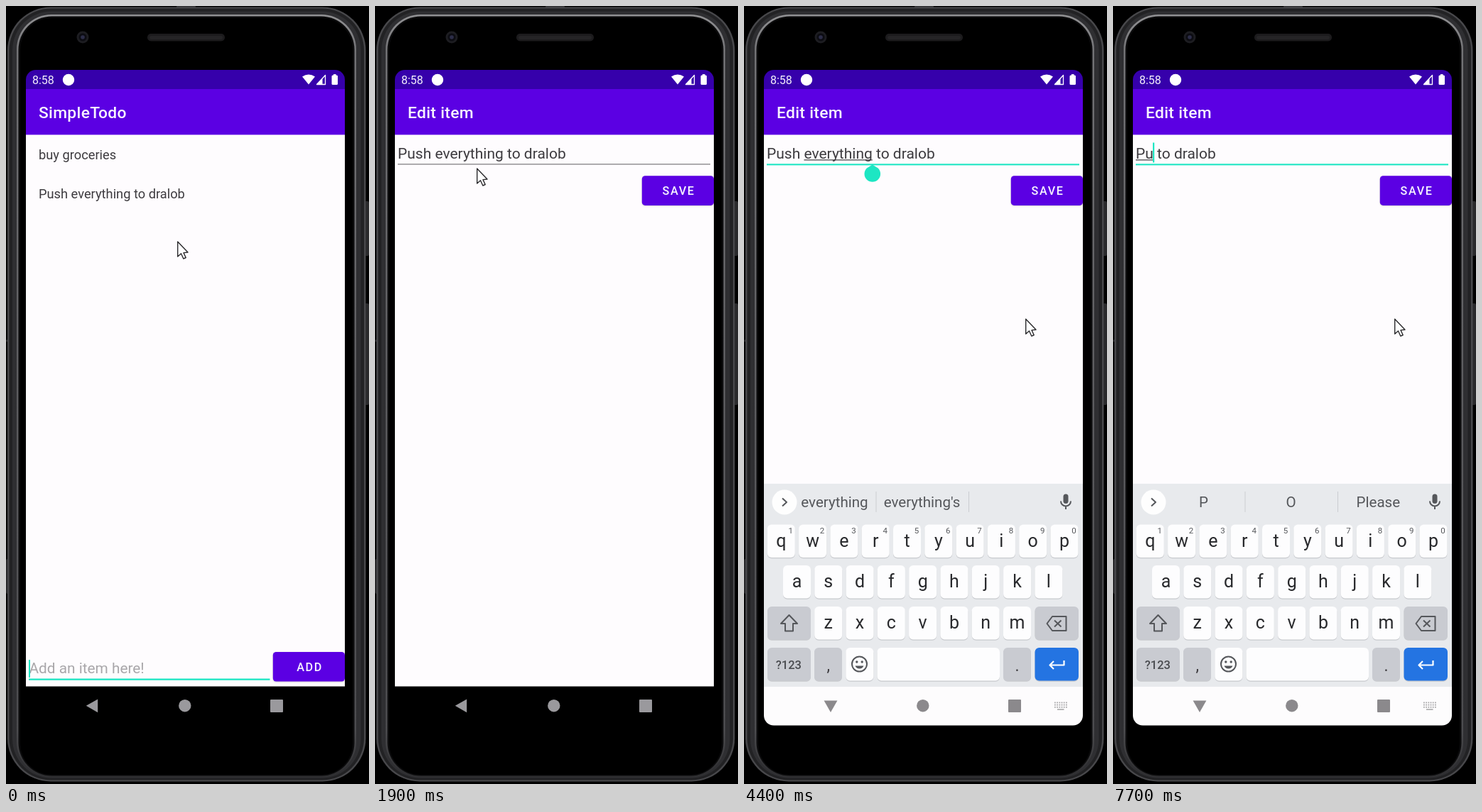
Recreate the animation shown at these times as an HTML page with a canvas. Size 511 px wide and 1096 px high, loop 8 s.

```html
<!DOCTYPE html>
<html lang="en">
<head>
<meta charset="utf-8">
<title>SimpleTodo</title>
<style>
html, body { margin: 0; width: 100%; height: 100%; overflow: hidden; background: #000; }
canvas { display: block; width: 511px; height: 1096px; }
</style>
</head>
<body>
<canvas id="stage"></canvas>
<script>
const W = 511, H = 1096, LOOP = 8000, STEP = 100;
const canvas = document.getElementById('stage');
const dpr = window.devicePixelRatio || 1;
canvas.width = W * dpr;
canvas.height = H * dpr;
const c = canvas.getContext('2d');

const PURPLE = '#5b00e3', DARK = '#3600ab', PAPER = '#fefcfe', TEAL = '#1de6c3';
const INK = '#3d3b3f', GREY = '#55575b';
const SCREEN = { x: 28, y: 90, w: 449, h: 923.5 };
const FIELD = 21, HINT = 20.57;
const TAIL = ' to dralob';

// [time, x, y] of the pointer tip
const POINTER = [
  [0, 241, 331], [100, 226, 321], [200, 190, 291], [300, 160, 266], [400, 145, 256],
  [1500, 145, 256], [1700, 143, 240], [2000, 143, 222], [2200, 148, 211], [2400, 165, 214],
  [2600, 178, 222], [2700, 178, 222], [2800, 179, 213], [3300, 179, 213], [3600, 273, 218],
  [3800, 345, 340], [4000, 396, 440]
];
const OPEN_SCALE = [[1100, .9], [1200, .955], [1300, .99], [1400, .997], [1500, 1]];
const EXIT_SCALE = [[1100, 1], [1200, 1.03], [1300, 1.046]];
const KEYS_DROP = [[3200, 345], [3300, 130], [3400, 52], [3500, 19], [3600, 6], [3700, 0]];
const BACK_TURN = [[3500, 0], [3600, -9], [3700, -50], [3800, -90]];

const TYPED = [
  [0, 'Push everything'], [4900, 'Push everythin'], [5100, 'Push everythi'], [5300, 'Push everyth'],
  [5500, 'Push everyt'], [5600, 'Push every'], [5700, 'Push ev'], [5800, 'Push'],
  [6000, 'Pu'], [6100, 'P'], [6200, ''], [7000, 'P'], [7700, 'Pu']
];
const HINTS = [
  [0, ['everything', "everything's"]],
  [5100, ['everythin', 'everything', "everything's"]],
  [5300, ['everythi', 'everything', "everything's"]],
  [5600, ['everyt', 'every', 'everything']],
  [5700, ['every', 'everyone', 'everything']],
  [5800, ['Push', 'push', 'Pushing']],
  [6200, null], [7700, ['P', 'O', 'Please']]
];

const within = (t, a, b) => t >= a && t < b;
const latest = (list, t) => list.filter(k => k[0] <= t).pop()[1];

function tween(keys, t, i = 1) {
  const n = keys.findIndex(k => k[0] > t);
  if (n < 0) return keys[keys.length - 1][i];
  if (n === 0) return keys[0][i];
  const a = keys[n - 1], b = keys[n];
  return a[i] + (b[i] - a[i]) * (t - a[0]) / (b[0] - a[0]);
}

function rect(x, y, w, h, color) {
  c.fillStyle = color;
  c.fillRect(x, y, w, h);
}
function round(x, y, w, h, r, color) {
  c.fillStyle = color;
  c.beginPath();
  c.roundRect(x, y, w, h, r);
  c.fill();
}
function dot(x, y, r, color) {
  c.fillStyle = color;
  c.beginPath();
  c.arc(x, y, r, 0, 7);
  c.fill();
}
function shape(path, fill, stroke, width = 2) {
  const p = new Path2D(path);
  if (fill) { c.fillStyle = fill; c.fill(p); }
  if (stroke) { c.strokeStyle = stroke; c.lineWidth = width; c.stroke(p); }
}
function setFont(size, weight = 400, gap = 0) {
  c.font = `${weight} ${size}px Roboto, "Noto Sans", sans-serif`;
  c.letterSpacing = gap + 'px';
}
function text(s, x, y, size, color, { weight = 400, align = 'left', gap = 0 } = {}) {
  setFont(size, weight, gap);
  c.textAlign = align;
  c.fillStyle = color;
  c.fillText(s, x, y);
}
function place(x, y, draw, scale = 1, turn = 0) {
  c.save();
  c.translate(x, y);
  c.rotate(turn * Math.PI / 180);
  c.scale(scale, scale);
  draw();
  c.restore();
}

function phone() {
  rect(0, 0, W, H, '#000');
  round(240, 0, 27, 5, 1, '#343436');
  for (const [x, y, h] of [[504, 275, 77], [504, 419, 143], [0, 470, 3], [0, 779, 49]])
    round(x, y, 7, h, 2, '#29292b');
  const rim = c.createLinearGradient(0, 0, 0, H);
  [[0, '#98989a'], [.06, '#727275'], [.5, '#5c5c5f'], [.93, '#4c4c4f'], [1, '#29292b']]
    .forEach(s => rim.addColorStop(...s));
  round(2, 1.5, 504.5, 1091, 61, '#48484b');
  round(4.5, 3.5, 499.5, 1087, 59, '#222224');
  round(9, 7.5, 490.5, 1080, 55, '#2f2f32');
  round(15, 12, 478, 1074, 49, rim);
  round(17.5, 14.5, 473, 1070, 47, '#0b0b0c');
  round(20, 17, 468, 1066, 44, '#000');
  round(199, 39, 109, 10.5, 5, '#1c1b1d');
  round(202, 42, 103, 5, 2.5, '#252426');
  dot(108, 44, 8.5, '#1d1d21');
  dot(108, 44, 5.5, '#0c0c12');
  dot(108, 44, 2.8, '#2c2d48');
}

function bars(title) {
  rect(28, 90, 449, 924, '#000');
  rect(28, 117, 449, 841.5, PAPER);
  rect(28, 90, 449, 27, DARK);
  rect(28, 117, 449, 64.4, PURPLE);
  text(title, 46, 158, 22.85, '#f8f4ff', { weight: 500, gap: .28 });
}

function button(label, y) {
  c.save();
  c.shadowColor = 'rgba(0,0,0,.22)';
  c.shadowBlur = 2;
  c.shadowOffsetY = .7;
  round(375.8, y, 101.2, 41.6, 4.5, PURPLE);
  c.restore();
  text(label, 427.6, y + 27, 16.2, '#f8f4ff', { weight: 500, align: 'center', gap: 1.6 });
}

function listScreen(t) {
  bars('SimpleTodo');
  if (t >= 1000) rect(28, 237, 449, 55, 'rgba(0,0,0,.07)');
  text('buy groceries', 46, 215.5, 18.28, INK);
  text('Push everything' + TAIL, 46, 270.5, 18.28, INK);
  text('Add an item here!', 32.5, 940, 20.8, '#a9a7aa');
  rect(32, 947.5, 339.5, 2.3, TEAL);
  if (t < 400 || t >= 900) rect(32, 921, 2, 25, TEAL);
  button('ADD', 910);
}

function editScreen(t) {
  bars('Edit item');
  button('SAVE', 239.3);
  const typed = latest(TYPED, t);
  text(typed + TAIL, 32, 214.5, FIELD, INK);
  const end = 32 + c.measureText(typed).width;
  const start = 32 + c.measureText(typed.slice(0, typed.lastIndexOf(' ') + 1)).width;
  if (t < 3200) return rect(32, 222.3, 440, 1.2, '#79777a');
  rect(32, 222.3, 440, 2.1, TEAL);
  rect(start, 216.3, end - start, 1.2, INK);
  const off = within(t, 4400, 4900) || within(t, 6700, 7000) || within(t, 7500, 7700);
  if (!off) rect(end - .8, 192.5, 2.2, 28, TEAL);
  if (t < 4900)
    place(end, 223.5, () => shape('M0 0L8 5A11.3 11.3 0 1 1-8 5Z', TEAL));
}

function statusIcons() {
  text('8:58', 37, 109.5, 16, '#f4f0fb');
  dot(88, 104, 8.2, '#fff');
  shape('M426 110.5L417 99.5Q426 93.5 435 99.5Z', '#fff');
  shape('M437.5 110.5H449.5V97.5Z', null, '#fff', 1.3);
  shape('M437 111L445.5 102V111Z', '#fff');
  round(458.5, 97.5, 8.5, 13.5, 1.5, '#fff');
  rect(461, 96, 3.5, 2, '#fff');
}

function navIcons(t) {
  const tone = t >= 3300 ? '#8b898c' : '#9a999d';
  place(122, 985.8, () => shape('M-9.2 0L7.2-9.4V9.4Z', tone), 1, tween(BACK_TURN, t));
  dot(251.8, 985.7, 8.7, tone);
  round(372, 977, 18, 18, 1, tone);
  if (t < 3400) return;
  for (let r = 0; r < 3; r++)
    for (let i = 0; i < 6; i++) rect(437 + i * 3.2, 980.5 + r * 3.2, 1.8, 1.8, '#a9a8aa');
  rect(441, 990.2, 9.5, 1.6, '#a9a8aa');
}

function key(x, y, w, color = '#fdfdfe') {
  round(x, y + 1.3, w, 46.5, 6, '#c8cace');
  round(x, y, w, 46.5, 6, color);
}

function letters(row, x, y, caps, digits) {
  [...row].forEach((ch, i) => {
    const cx = x + i * 44.3;
    key(cx - 19.5, y, 39);
    text(caps ? ch.toUpperCase() : ch, cx, y + 31, 25, '#28292c', { align: 'center' });
    if (digits) text((i + 1) % 10, cx + 13.5, y + 12.5, 11.5, GREY, { align: 'center' });
  });
}

function chevron(dir) {
  dot(57, 699, 17.5, '#fefefe');
  place(57, 699, () => shape(`M${-3 * dir}-5.5L${3 * dir} 0L${-3 * dir} 5.5`, null, GREY, 2));
}

function mic() {
  round(449.5, 687.5, 7, 13.5, 3.5, GREY);
  shape('M446 697.5A7 7 0 0 0 460 697.5M453 704.5V709', null, GREY, 2);
}

function hintStrip(words) {
  chevron(1);
  rect(185.5, 684, 1, 29, '#cbcdd1');
  rect(316, 684, 1, 29, '#cbcdd1');
  words.forEach((s, i) => {
    setFont(HINT);
    const size = i === 2 ? Math.min(HINT, HINT * 99 / c.measureText(s).width) : HINT;
    text(s, [127.5, 250.5, 373.3][i], 706, size, GREY, { align: 'center' });
  });
}

function toolStrip() {
  chevron(-1);
  shape('M119 696A6 6 0 1 0 107 696A6 6 0 1 0 119 696M117.5 700.5L125 708', null, GREY, 2.3);
  shape('M173 689H187Q188 689 188 690V700L181 707H173Q171 707 171 705V691Q171 689 173 689ZM188 700H183Q181 700 181 702V707M174 698Q178 703 182 699', null, GREY, 1.9);
  dot(176, 694.5, 1.3, GREY);
  dot(183.5, 694.5, 1.3, GREY);
  text('GIF', 243.5, 704, 15, GREY, { weight: 900, align: 'center', gap: .8 });
  shape('M302 690H316V709H302ZM305 697H313M305 701H313M305 705H310', null, GREY, 1.8);
  round(304.5, 687, 9, 6, 1.5, GREY);
  rect(348.5, 684, 1, 28, '#cbcdd1');
  for (const x of [381.5, 388.5, 395.5]) dot(x, 699, 2.3, GREY);
}

function keyboard(t) {
  const caps = within(t, 6100, 6200) || within(t, 7000, 7200);
  const words = latest(HINTS, t), side = '#c9cbd1';
  rect(28, 673, 449, 286, '#e8eaed');
  rect(28, 959, 449, 420, '#fdfcfd');
  if (words) hintStrip(words); else toolStrip();
  mic();
  letters('qwertyuiop', 52.3, 730.5, caps, true);
  letters('asdfghjkl', 74.5, 788, caps);
  letters('zxcvbnm', 118.7, 846, caps);

  key(33, 846, 61, side);
  shape('M63.5 858L75 870H69V880.5H58V870H52Z', caps ? GREY : null, GREY, 2);
  key(409.5, 846, 61.5, side);
  shape('M434 860H453.5V880H434L426.5 870ZM437 865.5L446.5 874.5M446.5 865.5L437 874.5', null, GREY, 2);

  key(33, 904, 61, side);
  text('?123', 62.8, 934, 16.5, '#4a4c50', { weight: 500, align: 'center' });
  key(99, 904, 39, side);
  text(',', 118.7, 937, 23, INK, { align: 'center' });
  key(143.3, 904, 39);
  c.beginPath();
  c.arc(162.5, 927, 10.5, 0, 7);
  c.strokeStyle = GREY;
  c.lineWidth = 2;
  c.stroke();
  dot(158.8, 924, 1.7, GREY);
  dot(166.2, 924, 1.7, GREY);
  shape('M156.5 929.5A6.5 6.5 0 0 0 168.5 929.5Z', GREY);
  key(187.5, 904, 172.5);
  key(365, 904, 39, side);
  text('.', 384.5, 937, 23, INK, { align: 'center' });
  key(409.5, 904, 61.5, '#2474e2');
  shape('M450.5 922V928.5H431M436 923L430.5 928.5L436 934', null, '#fff', 2.2);
}

function pointer(t) {
  place(tween(POINTER, t, 1), tween(POINTER, t, 2), () =>
    shape('M.7 1V22L5.5 17.8L8.8 25L12.2 23.5L9 16.6L15 16Z', '#fff', '#2b2a2d', 1.4));
}

// Scales a window about the middle of the screen.
function windowAt(scale, alpha, draw) {
  c.save();
  c.globalAlpha = alpha;
  c.translate(252.5, 551);
  c.scale(scale, scale);
  c.translate(-252.5, -551);
  draw();
  c.restore();
}

function render(t) {
  c.setTransform(dpr, 0, 0, dpr, 0, 0);
  c.lineJoin = 'round';
  phone();
  c.save();
  c.beginPath();
  c.roundRect(SCREEN.x, SCREEN.y, SCREEN.w, SCREEN.h, 14);
  c.clip();
  if (t < 1500) windowAt(tween(EXIT_SCALE, t), 1, () => listScreen(t));
  if (t >= 1200) windowAt(tween(OPEN_SCALE, t), t < 1300 ? .85 : 1, () => editScreen(t));
  if (t >= 3300) place(0, tween(KEYS_DROP, t), () => keyboard(t));
  statusIcons();
  navIcons(t);
  c.restore();
  pointer(t);
}

function frame() {
  render(Math.floor(performance.now() % LOOP / STEP) * STEP);
  requestAnimationFrame(frame);
}
frame();
</script>
</body>
</html>
```
